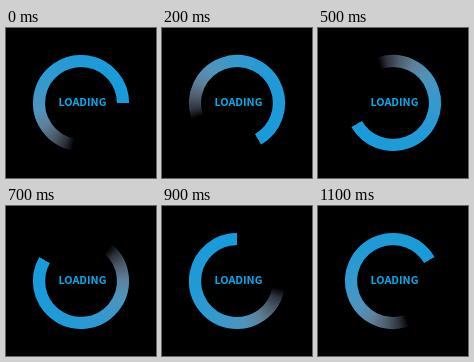
Animation of 150x150 px, one loop 1200 ms. Source, as an HTML page with a canvas:

```html
<!DOCTYPE html>
<html lang="en">
<head>
<meta charset="utf-8">
<title>Loading</title>
<style>
  html, body { margin: 0; width: 100%; height: 100%; overflow: hidden; background: #000; }
  canvas { display: block; }
</style>
</head>
<body>
<canvas id="stage" width="150" height="150"></canvas>
<script>
const ctx = document.getElementById('stage').getContext('2d');
const CENTER = 75, INNER = 36, OUTER = 48;
const STEPS = 12, STEP_MS = 100;
const rad = deg => deg * Math.PI / 180;

// Degrees clockwise from the head: the gap, the fading tail, the solid body
const TAIL = 100;
const BODY = [
  [TAIL, '#000000'],
  [112, '#2d333d'],
  [128, '#4d5b69'],
  [148, '#5f8099'],
  [170, '#5293ba'],
  [205, '#3799cc'],
  [260, '#219ad6'],
  [360, '#189bda']
];
const RIM = [
  [TAIL, 'rgba(0, 176, 245, 0)'],
  [220, 'rgba(0, 176, 245, 0.5)'],
  [360, 'rgba(0, 176, 245, 0.6)']
];

function drawArc(head, radius, width, stops) {
  const paint = ctx.createConicGradient(rad(head), CENTER, CENTER);
  for (const [deg, color] of stops) paint.addColorStop(deg / 360, color);
  ctx.strokeStyle = paint;
  ctx.lineWidth = width;
  ctx.beginPath();
  ctx.arc(CENTER, CENTER, radius, rad(head + TAIL), rad(head + 360));
  ctx.stroke();
}

function drawRing(head) {
  drawArc(head, (INNER + OUTER) / 2, OUTER - INNER, BODY);
  drawArc(head, INNER + 0.5, 1, RIM);
  drawArc(head, OUTER - 0.5, 1, RIM);
}

function drawLabel() {
  ctx.font = '700 10.8px "Noto Sans CJK JP", "Noto Sans CJK SC", "Open Sans", sans-serif';
  ctx.textAlign = 'center';
  ctx.textBaseline = 'alphabetic';
  ctx.fillStyle = '#00aeef';
  ctx.fillText('LOADING', 76.4, 78);
}

let start;
function frame(now) {
  start ??= now;
  const step = Math.floor((now - start) / STEP_MS) % STEPS;
  ctx.fillStyle = '#000';
  ctx.fillRect(0, 0, 150, 150);
  drawRing(step * 360 / STEPS);
  drawLabel();
  requestAnimationFrame(frame);
}
requestAnimationFrame(frame);
</script>
</body>
</html>
```
